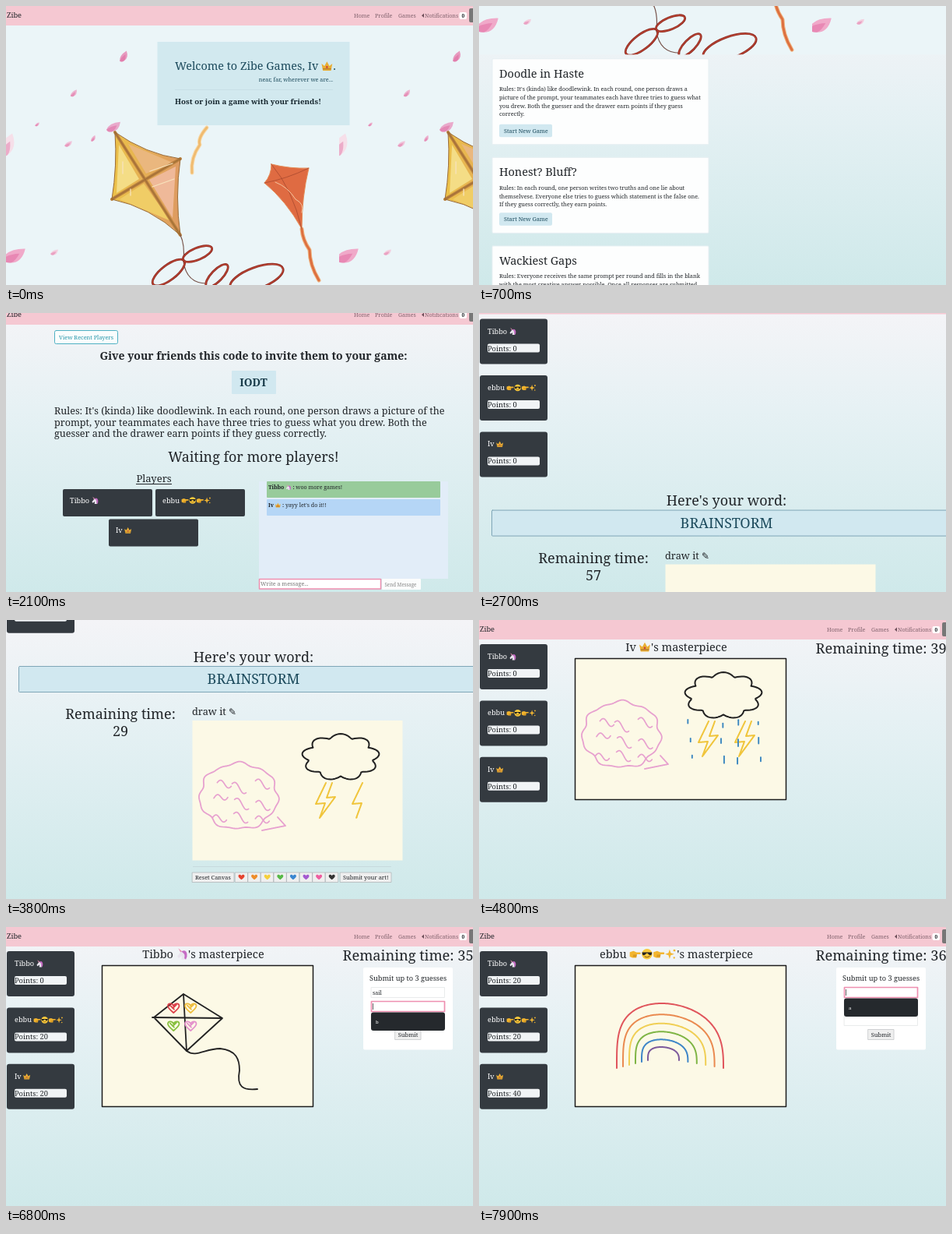
An HTML page with a canvas that plays this animation: 600x358 px, repeating every 8000 ms.

```html
<!DOCTYPE html>
<html lang="en">
<head>
<meta charset="utf-8">
<title>Party games</title>
<style>
html, body { margin: 0; width: 100%; height: 100%; overflow: hidden; }
canvas { display: block; width: 600px; height: 358px; }
</style>
</head>
<body>
<canvas id="stage"></canvas>
<script>
const W = 600, H = 358, LOOP = 8000, TILE = 428;
const stage = document.getElementById('stage'), g = stage.getContext('2d');
const dpr = window.devicePixelRatio || 1;
stage.width = W * dpr;
stage.height = H * dpr;

const INK = '#212529', DARK = '#343a40', SKY = '#d1e8f0', TEAL = '#1c4a5c', PAPER = '#fcf9e6', PINK = '#ee8fb0';
const players = ['Tibbo 🦄', 'ebbu 👉😎👉✨', 'Iv 👑'];

const part = (t, a, b) => Math.max(0, Math.min(1, (t - a) / (b - a)));
const ease = p => p * p * (3 - 2 * p);
const random = n => { const v = Math.sin(n * 12.9898) * 43758.5453; return v - Math.floor(v); };

// ---- drawing helpers ----
function box(x, y, w, h, fill, { r = 0, line, lw = 1 } = {}) {
  g.beginPath();
  g.roundRect(x, y, w, h, r);
  if (fill) { g.fillStyle = fill; g.fill(); }
  if (line) { g.strokeStyle = line; g.lineWidth = lw; g.stroke(); }
}
function disc(x, y, r, fill) {
  g.beginPath();
  g.arc(x, y, r, 0, 7);
  g.fillStyle = fill;
  g.fill();
}
function shape(d, fill, line, lw = 1) {
  const p = new Path2D(d);
  if (fill) { g.fillStyle = fill; g.fill(p); }
  if (line) { g.strokeStyle = line; g.lineWidth = lw; g.stroke(p); }
}
function shifted(x, y, draw) {
  g.save();
  g.translate(x, y);
  draw();
  g.restore();
}

const HEART = 'M.5 .9C.2 .65 0 .5 0 .3C0 .05 .35 0 .5 .28C.65 0 1 .05 1 .3C1 .5 .8 .65 .5 .9Z';

// small pictures in a unit square
const icons = {
  '👑'() {
    shape('M.02 .3L.28 .5L.5 .1L.72 .5L.98 .3L.86 .92H.14Z', '#e9ae34');
    shape('M.16 .76H.84', null, '#a9702a', .08);
    disc(.5, .6, .09, '#c9433c');
  },
  '🦄'() {
    shape('M.1 .72L.42 .3L.75 .3L.8 1H.45L.5 .7L.22 .88Z', '#e9e4ee');
    shape('M.45 .3Q.85 .05 .95 .5Q1 .8 .85 1L.72 .9Q.85 .5 .45 .3Z', '#c56bc4');
    shape('M.38 .36L.18 0L.5 .26Z', '#e58fb4');
  },
  '👉'() {
    shape('M.02 .35L.35 .25L.62 .36H.95Q1.04 .45 .95 .54H.65L.6 .85H.25L.02 .75Z', '#f3b52e');
    shape('M.35 .62H.63M.33 .74H.6', null, '#b97a14', .05);
  },
  '😎'() {
    disc(.5, .52, .47, '#f8c93c');
    shape('M.05 .36H.95L.88 .6Q.7 .7 .56 .46H.44Q.3 .7 .12 .6Z', '#222');
    shape('M.3 .74Q.5 .88 .72 .7', null, '#8a5a12', .07);
  },
  '✨'() {
    shape('M.4 .1L.5 .42L.82 .52L.5 .62L.4 .95L.3 .62L0 .52L.3 .42Z', '#f2b632');
    disc(.82, .2, .1, '#f2b632');
    disc(.8, .85, .08, '#f2b632');
  },
  '❌'() { shape('M.15 .2L.85 .9M.85 .2L.15 .9', null, '#d8303c', .2); }
};
const iconSplit = /(👑|🦄|👉|😎|✨|❌)/u;

function icon(draw, x, y, size) {
  shifted(x, y, () => { g.scale(size, size); draw(); });
}
// returns the x where the text ends
function text(s, x, y, size, { color = INK, bold, align = 0, family = '"Noto Serif", serif' } = {}) {
  g.font = `${bold ? 'bold ' : ''}${size}px ${family}`;
  const bits = s.split(iconSplit).filter(Boolean);
  const width = b => icons[b] ? size * 1.05 : g.measureText(b).width;
  x -= align * bits.reduce((sum, b) => sum + width(b), 0);
  for (const b of bits) {
    g.fillStyle = color;
    if (icons[b]) icon(icons[b], x, y - size * .85, size);
    else g.fillText(b, x, y);
    x += width(b);
  }
  return x;
}
const centred = (s, x, y, size, opt) => text(s, x, y, size, { ...opt, align: .5 });
const lines = (list, x, y, step, size) => list.forEach((s, i) => text(s, x, y + i * step, size));

// follows path(p) for p from 0 to the given amount
function trace(color, lw, path, amount = 1) {
  if (amount <= 0) return;
  const steps = Math.ceil(120 * amount);
  g.beginPath();
  for (let i = 0; i <= steps; i++) g.lineTo(...path(i / steps * amount));
  g.strokeStyle = color;
  g.lineWidth = lw;
  g.stroke();
}
// straight run through a few points
const along = (...pts) => p => {
  const i = Math.min(pts.length - 2, Math.floor(p * (pts.length - 1))), f = p * (pts.length - 1) - i;
  return pts[i].map((v, k) => v + (pts[i + 1][k] - v) * f);
};
// closed hand-drawn outline, bulge(angle) scales the radius
const blob = (x, y, rx, ry, bulge) => p => {
  const a = p * 2 * Math.PI - Math.PI / 2, r = bulge(a);
  return [x + rx * r * Math.cos(a), y + ry * r * Math.sin(a)];
};

function backdrop() {
  const fade = g.createLinearGradient(0, 0, 0, H);
  fade.addColorStop(0, '#f4f4f7');
  fade.addColorStop(.35, '#e6f1f4');
  fade.addColorStop(1, '#cfe9ea');
  g.fillStyle = fade;
  g.fillRect(0, 0, W, H);
}
function nav() {
  box(0, 0, W, 25, '#f5c8d2');
  text('Zibe', 1, 15, 9.2);
  const link = (s, x) => text(s, x, 15, 7.1, { color: '#80626d' });
  link('Home', 447);
  link('Profile', 474);
  link('Games', 504);
  link('Notifications', 538);
  shape('M537 9.5V15L534 12.2Z', '#6b4d58');
  box(582.5, 8, 9.5, 9, '#fff', { r: 2 });
  centred('0', 587.3, 15, 6.5, { bold: true });
  box(595, 3, 9, 18, '#777', { r: 2 });
}

// ---- home page ----
function petal(x, y, size, color) {
  shifted(x, y, () => {
    g.rotate(random(x) * .6 - .5);
    g.scale(size, size);
    shape('M-1 .4Q-.6 -.6 1 -.7Q.8 .6 -.2 .7Q-.8 .8 -1 .4Z', color);
    shape('M-1 .4Q-.4 -.1 .5 -.2Q.2 .5 -.2 .7Q-.8 .8 -1 .4Z', '#d9478a55');
  });
}
function yellowFlyer() {
  const sail = 'M140 162Q180 190 224 196Q217 245 224 294Q185 258 136 248Q143 205 140 162Z';
  const tint = g.createLinearGradient(136, 0, 224, 0);
  tint.addColorStop(0, '#ecc248');
  tint.addColorStop(1, '#dd9a62');
  shape(sail, tint);
  shape('M145 178L171 222L142 240Z', '#f4dd86');
  shape('M146 248L177 228L212 276Z', '#f0cd66');
  shape('M157 177L214 201L180 215Z', '#eab77e');
  shape('M218 206L214 272L184 223Z', '#efb999');
  shape('M140 162L224 294M136 248L224 196', null, '#b9803f', 4);
  shape(sail + 'M140 162L224 294M136 248L224 196', null, '#9a6a35', 1);
  shape('M185 212L214 202M188 232L216 222M150 200V215M160 235V243', null, '#f8e3bd', 1.3);
}
function ribbonLoop(x, y, length, turn) {
  g.beginPath();
  g.ellipse(x, y, length, length * .38, turn, 0, 7);
  for (const [color, lw] of [['#8f2a22', 2.8], ['#d0523a', .9]]) {
    g.strokeStyle = color;
    g.lineWidth = lw;
    g.stroke();
  }
}
function streamer(d, color, light) {
  shape(d, null, light, 5);
  shape(d, null, color, 3);
}
function scenery() {
  petal(151, 65, 7, '#e79abf');
  petal(87, 112, 5, '#ecb3cf');
  petal(40, 152, 3, '#ecaccb');
  petal(80, 177, 5, '#f0c3d9');
  petal(112, 170, 4, '#ecb0ce');
  petal(138, 155, 9, '#e9a9cb');
  petal(0, 180, 15, '#f6dfe9');
  petal(10, 320, 14, '#f0a9c9');
  petal(62, 316, 5, '#f3cfdf');
  yellowFlyer();
  shape('M224 294Q230 306 228 328Q232 356 258 356', null, '#76524a', 1.2);
  ribbonLoop(209, 342, 25, -.65);
  ribbonLoop(246, 318, 20, -.4);
  ribbonLoop(271, 346, 19, -.8);
  ribbonLoop(322, 349, 36, -.35);
  streamer('M258 156Q246 170 249 178Q237 195 239 214', '#f0bb70', '#f7dcae');
  streamer('M380 286Q381 300 390 313Q390 332 402 352', '#dd7040', '#efb684');
  shape('M341 203Q365 209 389 208Q380 245 380 286Q360 250 332 227Q341 217 341 203Z', '#df6b42', '#e58a55', 1);
  shape('M341 203Q368 235 380 286M332 227Q360 222 389 208', null, '#a9492f', .8);
  shape('M346 226Q362 232 372 248Q384 254 380 265', null, '#f5c6a0', 1);
}
function home() {
  box(0, 0, W, H, '#ebf5f8');
  for (let x = 0; x < W; x += TILE) {
    shifted(x, 0, () => {
      g.beginPath();
      g.rect(0, 0, TILE, H);
      g.clip();
      scenery();
    });
  }
  nav();
  box(194.5, 46, 247, 107, '#d2e9ef');
  text('Welcome to Zibe Games, Iv 👑.', 217, 82, 14.4, { color: TEAL });
  text('near, far, wherever we are...', 420, 97, 7.2, { color: TEAL, align: 1 });
  box(217, 107, 203, .7, '#c4dce3');
  text('Host or join a game with your friends!', 217, 125.5, 9.75, { bold: true, color: '#16262e' });
}

const games = {
  'Doodle in Haste': [
    "Rules: It's (kinda) like doodlewink. In each round, one person draws a",
    'picture of the prompt, your teammates each have three tries to guess what',
    'you drew. Both the guesser and the drawer earn points if they guess',
    'correctly.'],
  'Honest? Bluff?': [
    'Rules: In each round, one person writes two truths and one lie about',
    'themselvese. Everyone else tries to guess which statement is the false one.',
    'If they guess correctly, they earn points.'],
  'Wackiest Gaps': [
    'Rules: Everyone receives the same prompt per round and fills in the blank',
    'with the most creative answer possible. Once all responses are submitted,',
    'players vote which they think is the best, aka the maddest.']
};
function gameCards() {
  let y = 5.5;
  for (const [title, rules] of Object.entries(games)) {
    const h = 58 + 13 * rules.length;
    box(17, y, 278, h, '#fdfefe', { line: '#e6eff2', r: 1 });
    text(title, 26, y + 24, 14.5);
    lines(rules, 26, y + 41.5, 10.7, 7.3);
    box(26, y + h - 26, 68, 16.5, SKY, { r: 2 });
    text('Start New Game', 32, y + h - 15, 7.35, { color: TEAL });
    y += h + 16.6;
  }
}
function lobby(t) {
  backdrop();
  const scroll = H * ease(part(t, 150, 900));
  shifted(0, H - scroll, gameCards);
  shifted(0, -scroll, home);
}

// ---- waiting room ----
function message(y, color, name, words) {
  box(335, y, 223, 21, color, { r: 1 });
  const x = text(name + ' : ', 337, y + 10, 7, { bold: true });
  text(words, x, y + 10, 7.1);
}
function playerCard(name, x, y) {
  box(x, y, 115, 35, DARK, { r: 2 });
  text(name, x + 9, y + 17.5, 9.2, { color: '#fff' });
}
function waiting(t) {
  backdrop();
  shifted(0, -10 * ease(part(t, 1700, 2000)), () => {
    nav();
    g.translate(0, 10);
    box(62.5, 22.5, 81, 17, '#fafdfd', { r: 2, line: '#4fb0c3' });
    text('View Recent Players', 68, 33.5, 7.3, { color: '#2596aa' });
    centred('Give your friends this code to invite them to your game:', 318, 60, 14, { bold: true });
    box(290, 74, 57, 30, SKY, { r: 1 });
    centred('IODT', 318, 94, 13.7, { bold: true, color: '#183b49' });
    lines(["Rules: It's (kinda) like doodlewink. In each round, one person draws a picture of the",
      'prompt, your teammates each have three tries to guess what you drew. Both the',
      'guesser and the drawer earn points if they guess correctly.'], 62, 130, 14.6, 12.6);
    centred('Waiting for more players!', 318, 190.5, 17.9);
    centred('Players', 190, 217, 13);
    box(167, 219, 46, .9, INK);
    if (t >= 1600) playerCard(players[0], 73, 226);
    if (t >= 1700) playerCard(players[1], 192, 226);
    playerCard(players[2], 132, 264.5);
    box(325, 216, 243, 125, '#e2edf8');
    if (t >= 1900) message(216, '#98cb9b', players[0], 'woo more games!');
    if (t >= 2000) message(239, '#b5d6f6', players[2], "yayy let's do it!!");
    box(325.5, 341.5, 156, 12.5, '#fff', { line: PINK, lw: 1.5 });
    text('Write a message...', 327, 350, 7.2, { color: '#777' });
    box(483, 341, 50, 14, '#fbfcfc', { r: 1 });
    text('Send Message', 486.5, 350.5, 6.2, { color: '#888' });
  });
}

// ---- sketches, relative to the paper's corner ----
const brain = blob(59, 97, 50, 42, a => 1 + .035 * Math.sin(7 * a) + .025 * Math.sin(12 * a + 1));
const cloud = blob(190, 47, 41, 24.5, a => 1 + .22 * Math.abs(Math.sin(4.5 * (a - Math.PI / 2))));
const fold = i => p => {
  const x = 24 + i % 3 * 26 + 8 * random(i + 1), y = 76 + Math.floor(i / 3) * 21 + 8 * random(i + 5);
  const lean = random(i + 9) * 16 - 5;
  return [x + 18 * p, y + lean * p - 4 * Math.sin(p * 6)];
};
const bolt = x => along(...[[0, 0], [-13, 27], [-1, 26], [-8, 45], [12, 18], [1, 19], [8, 0]].map(([u, v]) => [x + u, 80 + v]));
const columns = [147, 189, 210, 235];
const drop = i => {
  const x = columns[i % 4] + 6 * random(i + 2) - 3, y = 78 + Math.floor(i / 4) * 22 + 5 * random(i);
  return along([x, y], [x, y + 2 + 7 * random(i + 4)]);
};

function storm(t) {
  trace('#e7a1cf', 1.8, brain, part(t, 2900, 3150));
  trace('#e7a1cf', 1.8, along([109, 124], [119, 135], [89, 141]), part(t, 3130, 3170));
  for (let i = 0; i < 9; i++) trace('#e7a1cf', 1.7, fold(i), part(t, 3150 + i * 22, 3180 + i * 22));
  trace('#222', 2, cloud, part(t, 3350, 3600));
  trace('#f0c53c', 2, bolt(171), part(t, 3600, 3720));
  trace('#f0c53c', 2, bolt(218), part(t, 3720, 3880));
  for (let i = 0; i < 12; i++) trace('#3a86c0', 1.9, drop(i), part(t, 3900 + i * 32, 3930 + i * 32));
}
function flyer() {
  shape('M104 36L154 67L108 109L66 66ZL108 109M64 66L154 67', null, '#222', 1.8);
  shape('M108 109C120 118 132 106 151 106C172 108 176 120 176 134C172 155 180 160 199 158', null, '#222', 1.8);
  ['#dc3e48', '#eebd3c', '#86bf3c', '#e391cb'].forEach((color, i) => icon(() => {
    shape(HEART + 'M.2 .25L.55 .6M.75 .2L.42 .5', null, color, .12);
  }, 84 + 22 * (i % 2), 47 + 23 * (i >> 1), 14.5));
}
function rainbow() {
  ['#e0555c', '#ea8a50', '#f0cf55', '#7fb545', '#3f86c8', '#7d5a9c'].forEach((color, i) => {
    const k = i / 5, left = 53 + 40 * k, width = 137 - 97 * k, base = 131 - 10 * k, top = 48 + 56 * k ** .85;
    trace(color, 2, p => [
      left + width * ((1 - Math.cos(Math.PI * p)) / 2) ** 1.25,
      base - (base - top) * Math.abs(Math.sin(Math.PI * p)) ** .7
    ]);
  });
}

// ---- game pages ----
function scores(points) {
  players.forEach((name, i) => {
    const y = 31 + i * 72.4;
    box(1, y, 87, 58, DARK, { r: 3 });
    text(name, 11, y + 19, 9.2, { color: '#fff' });
    box(11, y + 32, 67, 11, '#f1f4f6', { r: 2 });
    text('Points: ' + points[i], 11, y + 41, 9.3);
  });
}
const key = (x, w) => box(x, 324, w, 12.5, '#efefef', { line: '#b3b8ba', lw: .8 });
function drawing(t) {
  backdrop();
  shifted(0, -217 * ease(part(t, 2650, 2900)), () => {
    nav();
    scores([0, 0, 0]);
    g.translate(0, 217);
    centred("Here's your word:", 318, 53.5, 18);
    box(16.5, 59.5, W, 33, SKY, { line: '#7fa6b7', r: 1 });
    centred('BRAINSTORM', 318, 82, 18, { color: TEAL });
    centred('Remaining time:', 147, 127, 18);
    centred(String(Math.ceil(29 + (3800 - t) / 40)), 147, 149, 18);
    const x = text('draw it ', 239, 122, 12.8);
    text('✎', x, 122, 12, { family: '"DejaVu Sans", sans-serif' });
    box(239.5, 129, 270, 179.5, PAPER);
    shifted(240, 129, () => storm(t));
    box(240, 316, 255, .7, '#c3d5d9');
    key(239.5, 53.5);
    text('Reset Canvas', 243, 332.5, 7.4);
    ['#e5422d', '#ee8d2a', '#f5cf3b', '#57b947', '#3a86d0', '#a45ad0', '#ee5ea0', '#333'].forEach((color, i) => {
      key(294.5 + i * 16.6, 16);
      icon(() => shape(HEART, color), 298.5 + i * 16.6, 326, 8);
    });
    key(429.5, 65.5);
    text('Submit your art!', 433, 332.5, 7.4);
  });
}
function answerPanel(word, verdict, guesses) {
  box(432.5, 51.5, 180, 59 + guesses.length * 10.7, '#fff', { line: '#e2e8ea', r: 2 });
  text('The answer is ' + word, 442, 72, 11);
  text(verdict, 442, 87.5, 7.3);
  text('Their guesses were:', 442, 97.5, 7.3);
  guesses.forEach((s, i) => {
    disc(444.5, 106 + i * 10.8, 1.3, INK);
    text(s, 452, 108.5 + i * 10.8, 7.1);
  });
}
function guessPanel(typed, focus, hint) {
  box(459, 52, 115, 105.5, '#fff', { r: 2 });
  centred('Submit up to 3 guesses', 516.5, 69, 9.2);
  for (let i = 0; i < 3; i++) {
    const y = 77.5 + i * 18, on = i === focus;
    box(469.5, y, 94, 13, '#fff', { line: on ? PINK : '#e4e6e8', lw: on ? 1.7 : .8 });
    const x = text(i ? '' : typed, 471, y + 9, 7.2);
    if (on) box(x + .3, y + 2.5, .7, 8, INK);
  }
  box(500, 131.5, 33, 13, '#efefef', { line: '#c4c7c9', lw: .8 });
  centred('Submit', 516.5, 140.5, 7.5);
  if (hint) {
    const y = 91.5 + focus * 18;
    box(469, y, 95, 23.5, '#25292d', { r: 3 });
    text(hint, 475, y + 14, 6, { color: '#fff' });
  }
}

const rounds = [
  {
    start: 4580, artist: players[2], points: [0, 0, 0], art: () => storm(LOOP),
    panel(t) {
      if (t >= 5300) answerPanel('BRAINSTORM', players[0] + ' guessed it wrong ❌', ['POPCORN', 'STORM', 'JELLYBEANS']);
    }
  },
  {
    start: 6400, artist: players[0], points: [0, 20, 20], art: flyer,
    panel(t) {
      const second = t >= 6750;
      if (t >= 7100) answerPanel('SAIL', players[2] + ' guessed it right', ['SAIL']);
      else guessPanel('sail'.slice(0, Math.floor(part(t, 6450, 6650) * 4)), second ? 1 : 0, second && t < 6950 && 'b');
    }
  },
  {
    start: 7540, artist: players[1], points: [20, 20, 40], art: rainbow,
    panel(t) { guessPanel('', 0, t >= 7800 && 'a'); }
  }
];
function gallery(t) {
  const round = rounds.findLast(r => t >= r.start) || rounds[0];
  backdrop();
  nav();
  scores(round.points);
  centred(round.artist + "'s masterpiece", 253.5, 39.5, 14.5);
  box(123.5, 49.5, 271, 181, PAPER, { line: '#1c1c1c', lw: 1.5 });
  shifted(124, 50, round.art);
  const left = 45 - Math.max(0, Math.round((t - round.start) / 40));
  text('Remaining time: ' + left, 432.5, 43, 18.2);
  round.panel(t);
}

function frame(now) {
  const t = now % LOOP;
  g.setTransform(dpr, 0, 0, dpr, 0, 0);
  g.lineCap = g.lineJoin = 'round';
  const page = t < 1450 ? lobby : t < 2600 ? waiting : t < 4500 ? drawing : gallery;
  page(t);
  requestAnimationFrame(frame);
}
requestAnimationFrame(frame);
</script>
</body>
</html>
```
